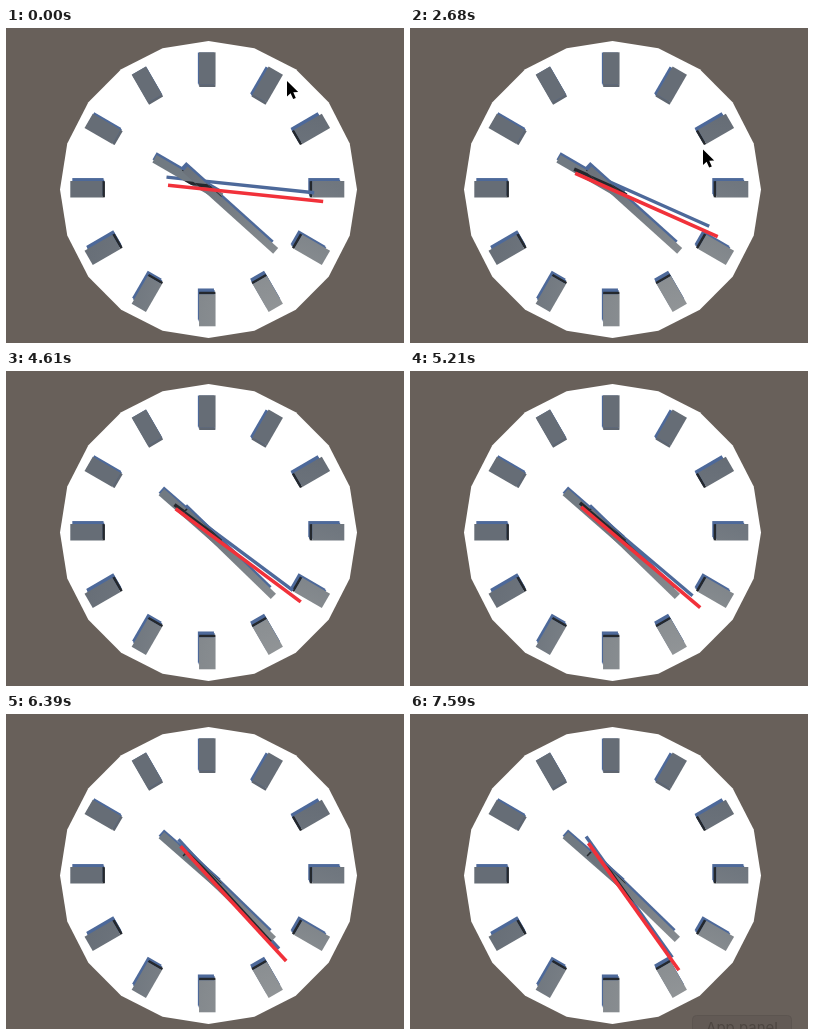
An HTML page with a canvas for the animation above (7.69 s loop, 398 px wide and 315 px high).

```html
<!DOCTYPE html>
<html lang="en">
<head>
<meta charset="utf-8">
<title>Clock</title>
<style>
html, body { margin: 0; width: 100%; height: 100%; overflow: hidden; background: #68605a; }
canvas { display: block; }
</style>
</head>
<body>
<canvas id="stage" width="398" height="315"></canvas>
<script>
const LOOP = 7690;
const SWEEP = 4309, STEP = 148.6; // smooth mode start and refresh interval
const CX = 201.3, CY = 161.3;
const SHADE = '#4d699a', DARK = '#24282d', RED = '#f1313a';
const ctx = document.getElementById('stage').getContext('2d');
const rad = deg => deg * Math.PI / 180;

// Ticking second-hand angles, clockwise from 3 o'clock
const TICKS = [[0, 6], [590, 12], [1640, 18], [2680, 24], [3570, 30]];
// Pointer positions; null hides it
const POINTER = [
  [0, [281, 53]], [150, [282, 68]], [300, [284, 94]], [450, [285, 115]], [590, [284.5, 122]],
  [1940, [289, 122]], [2090, [293, 121.5]], [2980, [302, 119.5]], [3130, null]
];
const at = (table, t) => table.filter(row => row[0] <= t).pop()[1];

function poly(points) {
  const p = new Path2D();
  points.forEach(([x, y]) => p.lineTo(x, y));
  p.closePath();
  return p;
}

// Corners of a bar along a ray, scaled about the centre and shifted
function corners(deg, from, to, width, scale = 1, dx = 0, dy = 0) {
  const c = Math.cos(rad(deg)) * scale, s = Math.sin(rad(deg)) * scale, h = width / 2;
  return [[from, -h], [to, -h], [to, h], [from, h]]
    .map(([u, v]) => [CX + dx + u * c - v * s, CY + dy + u * s + v * c]);
}
const bar = (...args) => poly(corners(...args));

function fill(path, color) {
  ctx.fillStyle = color;
  ctx.fill(path);
}

const metal = ctx.createRadialGradient(272, 298, 0, 272, 298, 215);
metal.addColorStop(0, '#949799');
metal.addColorStop(0.35, '#858a8e');
metal.addColorStop(0.7, '#70777f');
metal.addColorStop(1, '#666d76');

const face = poly(Array.from({ length: 20 }, (_, i) =>
  [202.5 + 148.5 * Math.cos(rad(i * 18)), 161.5 + 148.5 * Math.sin(rad(i * 18))]));

function marker(deg) {
  const box = [deg, 105, 137, 16.5];
  const top = corners(...box), base = corners(...box, 0.975);
  fill(bar(...box, 0.975, -0.7, -1.6), SHADE);
  fill(bar(...box, 0.975, -1.4, -3.2), SHADE);
  const lit = -0.35 * Math.cos(rad(deg)) - 0.94 * Math.sin(rad(deg));
  fill(poly([base[0], top[0], top[3], base[3]]), lit > 0.4 ? '#5f6670' : DARK);
  fill(poly(top), metal);
}

function hands(second, smooth) {
  const hour = [smooth ? 221.2 : 210, -16, 61, 8.5];
  const minute = [smooth ? 44.1 : 42, -30, 92, 7.5];
  const sec = [second, -39.5, 116.5, 3.6];
  const hourTop = bar(...hour), minuteTop = bar(...minute);

  fill(bar(...hour, 0.975, -1.2, -3.6), SHADE);
  fill(bar(...minute, 0.965, -2, -5.3), SHADE);
  fill(bar(...sec, 0.952, -3.4, -8.2), SHADE);

  fill(hourTop, '#717a82');
  ctx.save();
  ctx.clip(hourTop);
  fill(bar(...minute, 0.985, -1, -2), DARK);
  fill(bar(...sec, 0.98, -1.8, -4.5), DARK);
  ctx.restore();

  fill(minuteTop, metal);
  ctx.save();
  ctx.clip(minuteTop);
  fill(bar(...sec, 0.985, -1.2, -3.5), DARK);
  ctx.restore();

  fill(bar(...sec), RED);
}

const arrow = poly([[0, 0], [0, 15.5], [3.6, 12.2], [6.2, 18], [8.8, 16.9], [6.3, 11.2], [11.2, 11]]);

function pointer([x, y]) {
  ctx.save();
  ctx.translate(x, y);
  ctx.lineWidth = 1.6;
  ctx.lineJoin = 'round';
  ctx.strokeStyle = '#fff';
  ctx.stroke(arrow);
  fill(arrow, '#000');
  ctx.restore();
}

function tooltip() {
  ctx.beginPath();
  ctx.roundRect(282.5, 301.5, 99, 30, 4);
  ctx.fillStyle = '#625a55';
  ctx.fill();
  ctx.strokeStyle = '#5c5550';
  ctx.lineWidth = 1;
  ctx.stroke();
  ctx.font = '15px Inter, sans-serif';
  ctx.textAlign = 'center';
  ctx.fillStyle = '#4d4641';
  ctx.fillText('App panel', 332, 319);
}

function draw(t) {
  const smooth = t >= SWEEP;
  const step = Math.floor((t - SWEEP) / STEP);
  ctx.fillStyle = '#68605a';
  ctx.fillRect(0, 0, 398, 315);
  fill(face, '#fff');
  for (let i = 0; i < 12; i++) marker(i * 30);
  hands(smooth ? 34.9 + step * 0.892 : at(TICKS, t), smooth);
  const pos = at(POINTER, t);
  if (pos) pointer(pos);
  if (step >= 22) tooltip();
}

const start = performance.now();
function frame() {
  draw((performance.now() - start) % LOOP);
  requestAnimationFrame(frame);
}
frame();
</script>
</body>
</html>
```
